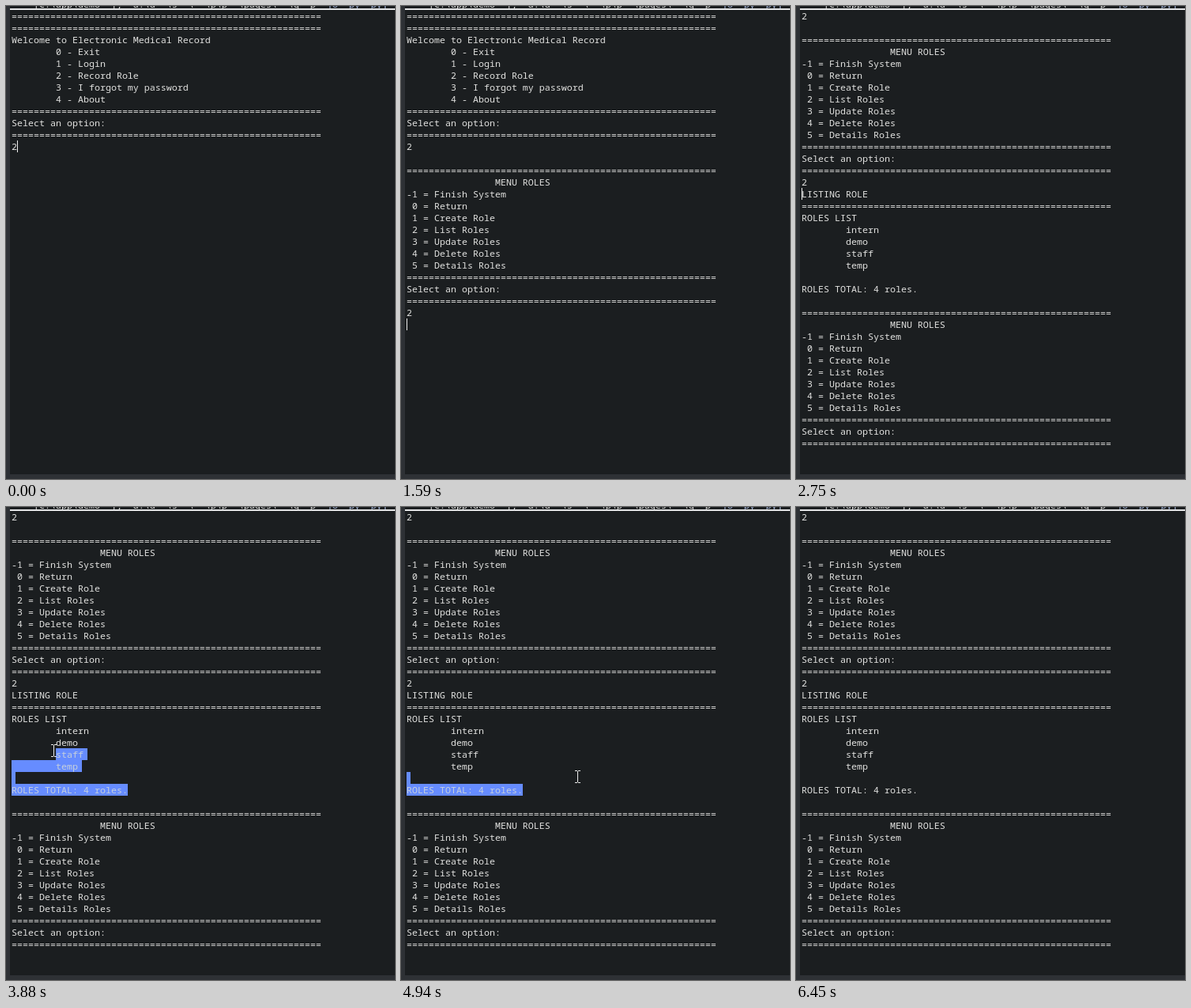
An HTML page for the animation above (6.55 s loop, 492 by 598 pixels).

```html
<!DOCTYPE html>
<html lang="en">
<head>
<meta charset="utf-8">
<title>Console menu</title>
<style>
html, body { margin: 0; width: 100%; height: 100%; overflow: hidden; background: #1b1e20; }
body { position: relative; }
pre, div, svg { position: absolute; margin: 0; }
pre { left: 7px; font: 11.667px/15px "Noto Sans Mono", "DejaVu Sans Mono", monospace; color: #e2e2e0; }
#log { top: 5px; }
#log div { position: static; height: 15px; }
#log span { display: inline-block; height: 15px; vertical-align: top; background: #668cff; color: #c6d0dc; }
#log span.eol { padding-right: 5px; }
#above { top: -10px; }
#above i { font-style: normal; color: #a9b9dc; }
#rule { left: 5px; right: 0; top: 3px; height: 2px; background: #e4e5e6; }
#left { left: 0; top: 0; bottom: 0; width: 5px; background: #2e3135; }
#bottom { left: 0; right: 0; top: 592px; bottom: 0; background: #2e3135; }
#caret { width: 1px; height: 15px; background: #f0f0f0; }
#beam { width: 7px; height: 16px; fill: none; stroke: #eee; }
</style>
</head>
<body>
<pre id="above">    [C:\app\demo  ],  a:\d  \s  \  \p\p  \pages\  \g  p  <i>jo  py  pyj  py  p</i></pre>
<div id="rule"></div>
<pre id="log"></pre>
<div id="left"></div>
<div id="bottom"></div>
<div id="caret"></div>
<svg id="beam" shape-rendering="crispEdges"><path d="M0 .5h3m1 0h3M3.5 1v14M0 15.5h3m1 0h3"/></svg>
<script>
const $ = id => document.getElementById(id);
const LOOP = 6550, CHAR = 7, ROW = 15, LEFT = 7, TOP = 5;
const bar = '='.repeat(56), tab = ' '.repeat(8);
const ask = [bar, 'Select an option:', bar];
const menu = [bar, tab + tab + 'MENU ROLES', '-1 = Finish System',
  ...['Return', 'Create Role', 'List Roles', 'Update Roles', 'Delete Roles', 'Details Roles']
    .map((s, i) => ` ${i} = ${s}`), ...ask];
const lines = [bar, bar, 'Welcome to Electronic Medical Record',
  ...['Exit', 'Login', 'Record Role', 'I forgot my password', 'About'].map((s, i) => `${tab}${i} - ${s}`),
  ...ask, '2', '', ...menu, '2', 'LISTING ROLE', bar, 'ROLES LIST',
  ...['intern', 'demo', 'staff', 'temp'].map(s => tab + s),
  '', 'ROLES TOTAL: 4 roles.', '', ...menu];
const SEL_END = 34;

// caret: [column, screen row]; beam: [x, y]; sel: [line, column] where the selection starts
const steps = [
  [0, { first: 0, count: 12, caret: [1, 11], beam: null, sel: null }],
  [120, { caret: [0, 12] }],
  [270, { count: 25 }],
  [730, { caret: null }],
  [1450, { count: 26, caret: [1, 25] }],
  [1590, { caret: [0, 26] }],
  [1720, { first: 11, count: 48, caret: [0, 15] }],
  [2320, { caret: null }],
  [2750, { caret: [0, 15] }],
  [3160, { beam: [353, 384] }],
  [3310, { beam: [285, 362], caret: null }],
  [3430, { beam: [205, 345] }],
  [3580, { beam: [193, 352] }],
  [3730, { beam: [181, 352] }],
  [3880, { beam: [57, 300], sel: [31, 8] }],
  [4000, { beam: [35, 285], sel: [30, 4] }],
  [4130, { beam: [14, 270], sel: [29, 1] }],
  [4250, { beam: [1, 259], sel: [28, 0] }],
  [4400, { beam: [0, 264] }],
  [4520, { beam: [6, 271] }],
  [4670, { beam: [1, 268] }],
  [4790, { beam: [149, 328] }],
  [4940, { beam: [220, 333], sel: [33, 0] }],
  [5100, { beam: [239, 336], sel: null, caret: [0, 22] }],
  [5410, { beam: [266, 383] }],
  [5560, { beam: [287, 408] }],
  [5710, { beam: [365, 498], caret: null }],
  [5860, { beam: [412, 551] }],
  [6030, { beam: null }],
  [6150, { caret: [0, 22] }],
  [6450, { caret: null }]
];

function place(el, pos) {
  el.style.display = pos ? 'block' : 'none';
  if (pos) [el.style.left, el.style.top] = pos.map(v => v + 'px');
}

function lineHtml(text, n, sel) {
  if (!sel || n < sel[0] || n > SEL_END) return `<div>${text}</div>`;
  const from = n === sel[0] ? sel[1] : 0;
  const cls = n < SEL_END ? 'eol' : '';
  return `<div>${text.slice(0, from)}<span class="${cls}">${text.slice(from)}</span></div>`;
}

let shown = -1;
function draw(now) {
  const t = now % LOOP;
  const index = steps.filter(s => s[0] <= t).length;
  if (index !== shown) {
    shown = index;
    const s = Object.assign({}, ...steps.slice(0, index).map(e => e[1]));
    $('log').innerHTML = lines.slice(s.first, s.count)
      .map((text, i) => lineHtml(text, s.first + i, s.sel)).join('');
    place($('caret'), s.caret && [LEFT + s.caret[0] * CHAR, TOP + s.caret[1] * ROW]);
    place($('beam'), s.beam);
  }
  requestAnimationFrame(() => draw(performance.now()));
}
draw(performance.now());
</script>
</body>
</html>
```
